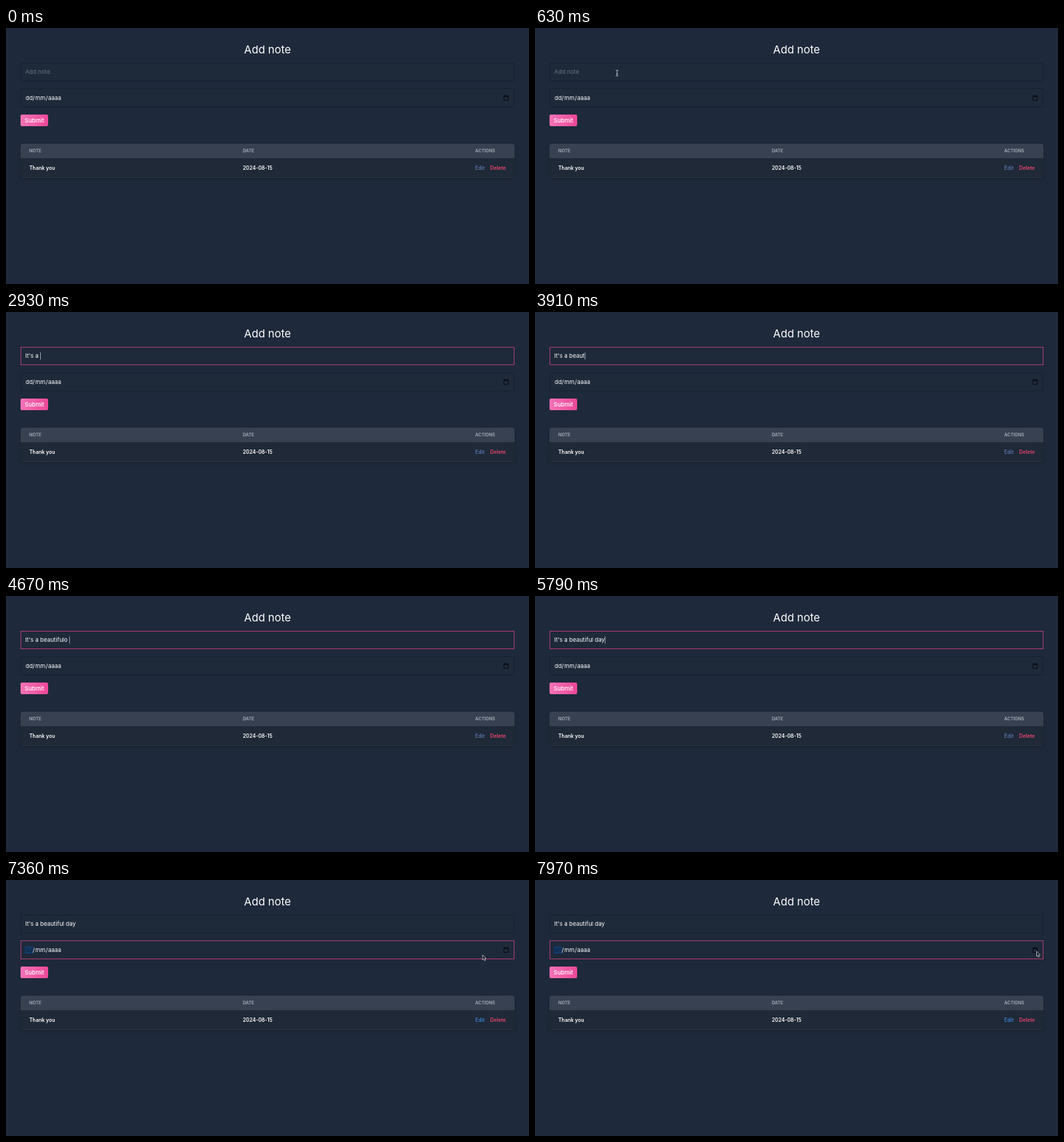
An HTML page that plays this animation: 720x352 px, repeating every 8 s.

```html
<!DOCTYPE html>
<html lang="en">
<head>
<meta charset="utf-8">
<title>Add note</title>
<style>
  html, body { margin: 0; width: 100%; height: 100%; overflow: hidden; background: #1e293b; }
  svg { display: block; width: 720px; height: 352px; font-family: Inter, sans-serif; }
  text { white-space: pre; fill: #fff; }
  .field { fill: #1e293a; stroke: #172131; }
  .field.focus { stroke: #a73c6e; }
  .input { font-size: 8px; }
  .head { font-size: 6px; font-weight: 700; fill: #9ca3af; }
  .cell { font-size: 7px; font-weight: 600; }
  .link { font-size: 7px; font-weight: 600; }
  .table { filter: drop-shadow(0 2px 2px #0002); }
</style>
</head>
<body>
<svg viewBox="0 0 720 352">
  <defs>
    <linearGradient id="pink"><stop stop-color="#f472b6"/><stop offset="1" stop-color="#ec4899"/></linearGradient>
  </defs>
  <text x="360" y="34.5" font-size="15" text-anchor="middle">Add note</text>

  <rect id="noteField" class="field" x="20.5" y="48.5" width="679" height="24"/>
  <text id="placeholder" class="input" x="26.5" y="63" style="fill:#697280">Add note</text>
  <text id="note" class="input" x="26.5" y="63"></text>
  <rect id="caret" y="55.5" width=".8" height="10" fill="#aab2c4"/>

  <rect id="dateField" class="field" x="20.5" y="83.5" width="679" height="25"/>
  <rect id="selection" x="26" y="91.5" width="11.5" height="9.5" fill="#123c6c"/>
  <text class="input" x="27" y="99"><tspan id="day">dd</tspan>/<tspan dx=".5">mm</tspan><tspan dx=".5">/</tspan><tspan dx=".5">aaaa</tspan></text>
  <path d="M685.5 93.5h6v6h-6zM685.5 94.3h6M687 92v1.5M690 92v1.5" fill="none" stroke="#080c14"/>

  <rect x="20" y="119" width="38" height="16" rx="2" fill="url(#pink)"/>
  <text class="input" x="39.2" y="130" text-anchor="middle" font-weight="500">Submit</text>

  <g class="table">
    <path d="M20 179v-16a4 4 0 0 1 4-4h672a4 4 0 0 1 4 4v16z" fill="#374151"/>
    <path d="M20 179h680v23a4 4 0 0 1-4 4h-672a4 4 0 0 1-4-4z" fill="#1f2937"/>
  </g>
  <path d="M22 205.5h676" stroke="#2b3544"/>
  <text class="head" x="32" y="171.2">NOTE</text>
  <text class="head" x="326" y="171.2">DATE</text>
  <text class="head" x="646" y="171.2">ACTIONS</text>
  <text class="cell" x="32" y="194.5">Thank you</text>
  <text class="cell" x="326" y="194.5">2024-08-15</text>
  <text id="edit" class="link" x="646" y="194.5">Edit</text>
  <text class="link" x="666.5" y="194.5" style="fill:#e8436c">Delete</text>

  <path id="beam" d="M-1.8-4Q0-4 0-3Q0-4 1.8-4M0-3V3M-1.8 4Q0 4 0 3Q0 4 1.8 4M-1 1H1" fill="none" stroke="#c3c8d0" stroke-width=".9"/>
  <path id="arrow" d="M0 0V7L1.6 5.6L2.7 8L3.9 7.5L2.9 5.1H4.9Z" fill="#111722" stroke="#d5d9e0" stroke-width=".7"/>
</svg>
<script>
  const LOOP = 8000, NOTE_FOCUS = 730, DATE_FOCUS = 7090;
  const el = id => document.getElementById(id);
  const show = (id, on) => el(id).setAttribute('visibility', on ? 'visible' : 'hidden');

  // Evenly typed runs; "<" is a backspace.
  const runs = [
    { keys: 'I', start: 1690, gap: 290 },
    { keys: "t's a ", start: 1980, gap: 190 },
    { keys: 'beautifulo ', start: 3240, gap: 143 },
    { keys: '<< day', start: 5070, gap: 144 }
  ];

  const moves = [
    { start: 130, end: 600, from: [150, 76], to: [113, 62] },
    { start: 6250, end: 6630, from: [113, 62], to: [673, 111] },
    { start: 6630, end: 7050, from: [673, 111], to: [652, 103.5] },
    { start: 7300, end: 7600, from: [652, 103.5], to: [690.5, 98] }
  ];

  function typing(t) {
    let text = '', last = NOTE_FOCUS;
    for (const { keys, start, gap } of runs) {
      [...keys].forEach((key, i) => {
        const time = start + i * gap;
        if (time > t) return;
        text = key === '<' ? text.slice(0, -1) : text + key;
        last = time;
      });
    }
    return { text, last };
  }

  function mouseAt(t) {
    const hiddenWhileTyping = t >= runs[1].start && t < moves[1].start;
    const move = moves.filter(m => m.start <= t).pop();
    if (!move || hiddenWhileTyping) return null;
    const k = Math.min(1, (t - move.start) / (move.end - move.start));
    const ease = k * k * (3 - 2 * k);
    return move.from.map((a, i) => a + (move.to[i] - a) * ease);
  }

  function render(t) {
    const { text, last } = typing(t);
    const inNote = t >= NOTE_FOCUS && t < DATE_FOCUS, inDate = t >= DATE_FOCUS;

    el('note').textContent = text;
    show('placeholder', !text);
    el('noteField').classList.toggle('focus', inNote);
    el('dateField').classList.toggle('focus', inDate);
    show('selection', inDate);
    el('day').style.fill = inDate ? '#101f36' : '';
    el('edit').style.fill = inDate ? '#3b7fd0' : '#5876ae';

    show('caret', inNote && (t - last) % 1000 < 500);
    el('caret').setAttribute('x', 26.6 + (text ? el('note').getComputedTextLength() : 0));

    const mouse = mouseAt(t), overNote = mouse && mouse[1] > 48 && mouse[1] < 73;
    show('beam', overNote);
    show('arrow', mouse && !overNote);
    if (mouse) el(overNote ? 'beam' : 'arrow').setAttribute('transform', `translate(${mouse})`);
  }

  const start = performance.now();
  function tick() {
    render((performance.now() - start) % LOOP);
    requestAnimationFrame(tick);
  }
  tick();
</script>
</body>
</html>
```
